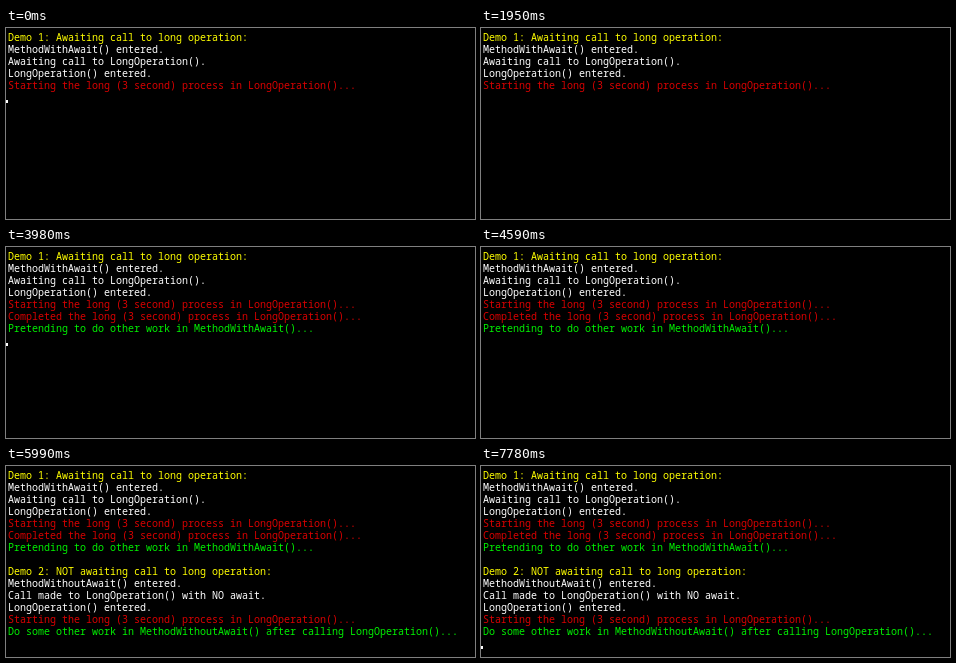
Write an HTML page that moves like this. It is 469 px wide and 191 px high and loops after 8000 ms.

```html
<!DOCTYPE html>
<html lang="en">
<head>
<meta charset="utf-8">
<title>Async console demo</title>
<style>
  html, body { margin: 0; width: 100%; height: 100%; overflow: hidden; background: #000; }
  svg { display: block; }
  text { font: 500 10px "Noto Sans Mono", "Liberation Mono", monospace; white-space: pre; }
</style>
</head>
<body>
<svg id="console" width="469" height="191" viewBox="0 0 469 191"></svg>
<script>
const LOOP = 8000;
const ROW_HEIGHT = 12;
const YELLOW = "#ffff00", WHITE = "#ffffff", RED = "#d80000", GREEN = "#00f000";

// Each batch of output appears at once, at the given time in ms.
const batches = [
  { at: 0, row: 0, lines: [
    [YELLOW, "Demo 1: Awaiting call to long operation:"],
    [WHITE, "MethodWithAwait() entered."],
    [WHITE, "Awaiting call to LongOperation()."],
    [WHITE, "LongOperation() entered."],
    [RED, "Starting the long (3 second) process in LongOperation()..."],
  ]},
  { at: 3980, row: 5, lines: [
    [RED, "Completed the long (3 second) process in LongOperation()..."],
    [GREEN, "Pretending to do other work in MethodWithAwait()..."],
  ]},
  { at: 5990, row: 8, lines: [
    [YELLOW, "Demo 2: NOT awaiting call to long operation:"],
    [WHITE, "MethodWithoutAwait() entered."],
    [WHITE, "Call made to LongOperation() with NO await."],
    [WHITE, "LongOperation() entered."],
    [RED, "Starting the long (3 second) process in LongOperation()..."],
    [GREEN, "Do some other work in MethodWithoutAwait() after calling LongOperation()..."],
  ]},
];

// Intervals during which the cursor is lit.
const cursorLit = [
  [0, 850], [1400, 1950], [2500, 2970], [3500, 4590],
  [5140, 5610], [6700, 7230], [7780, 8000],
];

const stage = document.getElementById("console");

function add(parent, tag, attributes) {
  const node = document.createElementNS("http://www.w3.org/2000/svg", tag);
  for (const name in attributes) node.setAttribute(name, attributes[name]);
  return parent.appendChild(node);
}

const show = (node, visible) => node.setAttribute("visibility", visible ? "visible" : "hidden");

for (const batch of batches) {
  batch.group = add(stage, "g", {});
  batch.lines.forEach(([fill, content], i) => {
    const y = 13 + (batch.row + i) * ROW_HEIGHT;
    add(batch.group, "text", { x: 2, y, fill }).textContent = content;
  });
}
const cursor = add(stage, "rect", { x: 0, width: 2, height: 3, fill: WHITE });

function render(now) {
  const t = now % LOOP;
  for (const batch of batches) show(batch.group, t >= batch.at);
  const latest = batches.filter(batch => t >= batch.at).pop();
  cursor.setAttribute("y", 12 + (latest.row + latest.lines.length) * ROW_HEIGHT);
  show(cursor, cursorLit.some(([on, off]) => t >= on && t < off));
}

function frame() {
  render(performance.now());
  requestAnimationFrame(frame);
}
frame();
</script>
</body>
</html>
```
